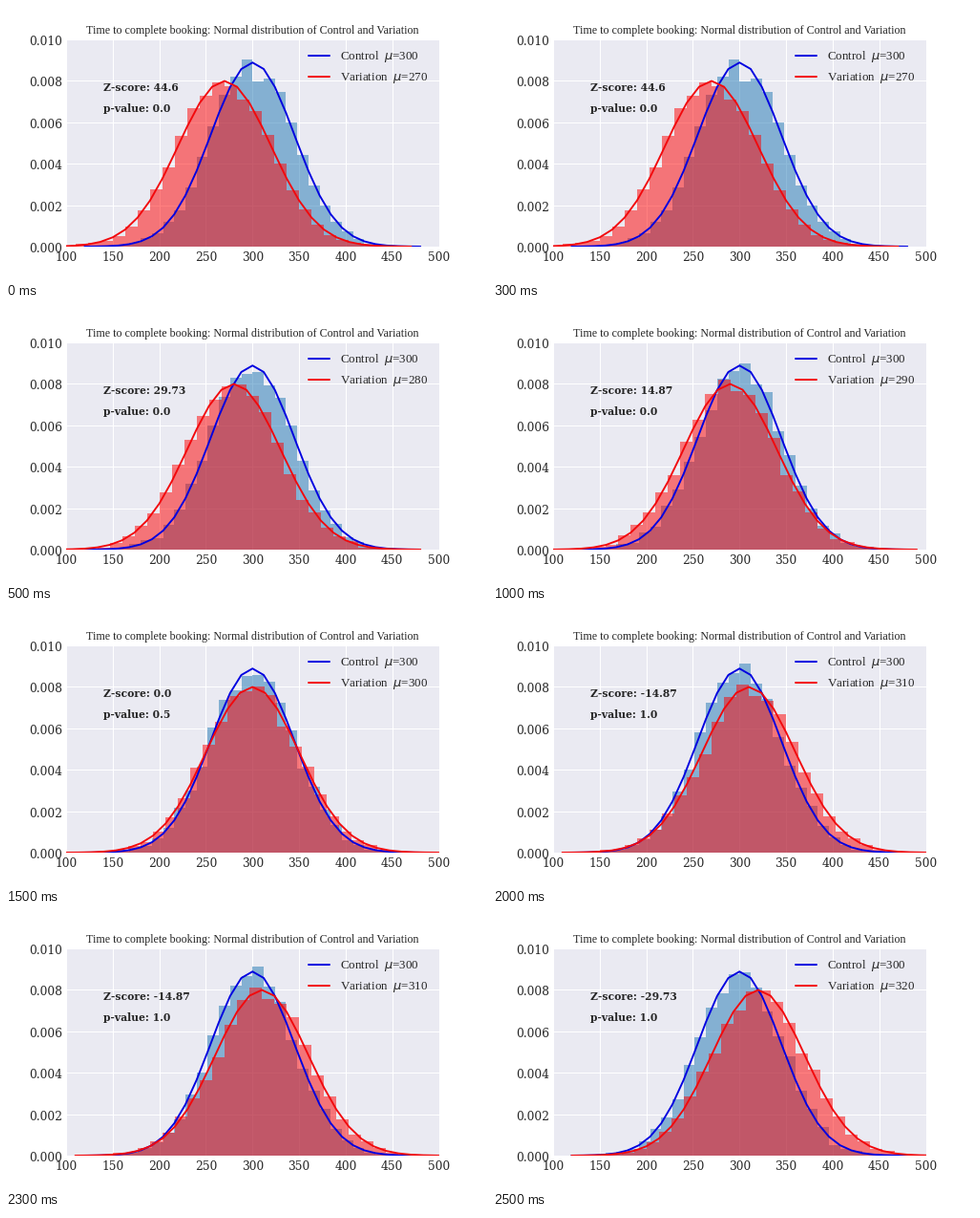
These frames come from a looping animation (504 px wide and 288 px high, 3000 ms). A matplotlib script:

```python
import math

import matplotlib.pyplot as plt
import numpy as np
from matplotlib.animation import FuncAnimation
from matplotlib.transforms import Affine2D

W, H, DPI = 504, 288, 72
LEFT, RIGHT, TOP, BOTTOM = 63.0, 453.6, 34.56, 252.0
X_MIN, X_MAX, Y_MAX = 100, 500, 0.01
SAMPLES, BINS, SPREAD = 10000, 30, 4
CONTROL_MU, CONTROL_SD, VARIATION_SD = 300, 45, 50
MEANS = range(270, 330, 10)

INK = "#262626"
BLUE, RED = "#0000e0", "#f2080c"
BLUE_FILL, RED_FILL = "#1f77b4", "#ff0000"
SERIF, WIDE_SERIF = "Liberation Serif", "DejaVu Serif"


def to_x(px):
    return X_MIN + (px - LEFT) * (X_MAX - X_MIN) / (RIGHT - LEFT)


def to_y(py):
    return (BOTTOM - py) * Y_MAX / (BOTTOM - TOP)


def pdf(x, mu, sd):
    return np.exp(-((x - mu) / sd) ** 2 / 2) / (sd * math.sqrt(2 * math.pi))


def draw_group(rng, mu, sd, fill, color):
    edges = np.linspace(mu - SPREAD * sd, mu + SPREAD * sd, BINS + 1)
    heights, _ = np.histogram(rng.normal(mu, sd, SAMPLES), edges, density=True)
    ax.stairs(heights, edges, fill=True, color=fill, alpha=0.5, lw=0)
    ax.plot(edges, pdf(edges, mu, sd), color=color, lw=1.9)


def draw_key(y, name, mu, color):
    ax.plot([to_x(317), to_x(339)], [to_y(y)] * 2, color=color, lw=2,
            solid_capstyle="round")
    ax.text(to_x(350), to_y(y + 4.3), rf"{name}  $\mu$={mu}",
            family=SERIF, size=13, color=INK)


def style_axes():
    ax.set(xlim=(X_MIN, X_MAX), ylim=(0, Y_MAX), facecolor="#eaeaf2")
    ax.set_xticks(range(X_MIN, X_MAX + 1, 50))
    ax.set_yticks(np.linspace(0, Y_MAX, 6))
    ax.yaxis.set_major_formatter("{x:.3f}")
    ax.grid(color="white", lw=1)
    ax.set_axisbelow(True)
    ax.spines[:].set_visible(False)
    ax.tick_params(length=0, labelsize=12.2, labelcolor=INK,
                   labelfontfamily=WIDE_SERIF)
    ax.tick_params(axis="x", pad=5)
    ax.tick_params(axis="y", pad=4)
    for label in ax.get_yticklabels():
        label.set_transform(label.get_transform()
                            + Affine2D().translate(0, -1))
    ax.set_title("Time to complete booking: Normal distribution of "
                 "Control and Variation",
                 family=SERIF, size=12, color=INK, pad=6)


def update(i):
    ax.clear()
    style_axes()
    mu = MEANS[i]
    rng = np.random.default_rng(i)
    draw_group(rng, CONTROL_MU, CONTROL_SD, BLUE_FILL, BLUE)
    draw_group(rng, mu, VARIATION_SD, RED_FILL, RED)

    error = math.sqrt((CONTROL_SD ** 2 + VARIATION_SD ** 2) / SAMPLES)
    z = (CONTROL_MU - mu) / error
    p = math.erfc(z / math.sqrt(2)) / 2
    notes = ((0.0075, f"Z-score: {round(z, 2)}"),
             (0.0065, f"p-value: {round(p, 2)}"))
    for y, note in notes:
        ax.text(140, y, note, family=WIDE_SERIF, weight="bold", size=10.8,
                color=INK)

    draw_key(52, "Control", CONTROL_MU, BLUE)
    draw_key(74, "Variation", mu, RED)


fig = plt.figure(figsize=(W / DPI, H / DPI), dpi=DPI, facecolor="white")
ax = fig.add_axes([LEFT / W, 1 - BOTTOM / H,
                   (RIGHT - LEFT) / W, (BOTTOM - TOP) / H])
anim = FuncAnimation(fig, update, frames=len(MEANS), interval=500, repeat=True)
plt.show()
```
